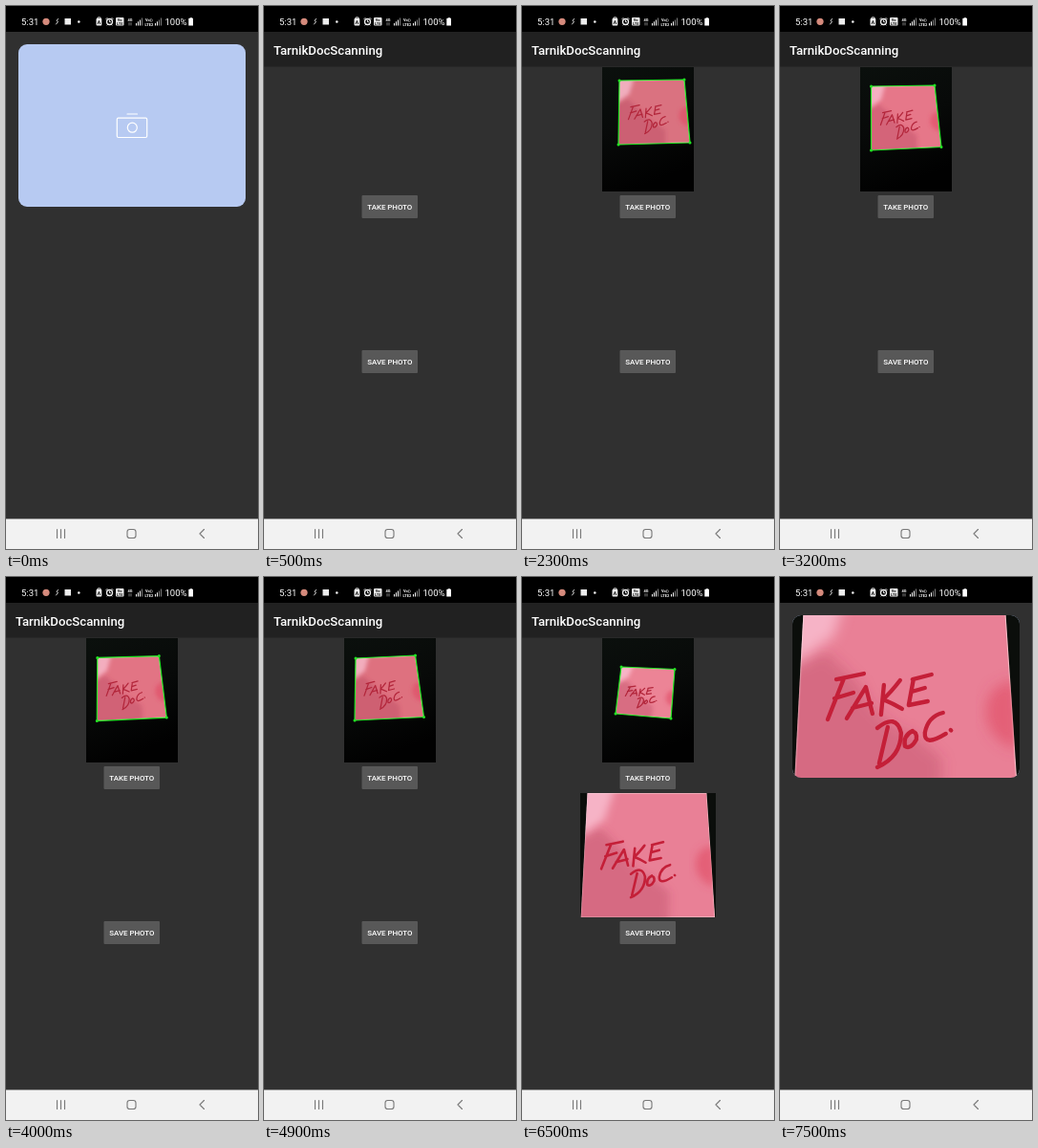
Write an HTML page that moves like this. It is 264 by 568 pixels and loops after 7.6 s.

```html
<!DOCTYPE html>
<html lang="en">
<head>
<meta charset="utf-8">
<title>Document scanner</title>
<style>
  html, body { margin: 0; width: 100%; height: 100%; overflow: hidden; background: #303030; }
  svg { display: block; }
  #stage { width: 264px; height: 568px; }
  text { font-family: Roboto, "Open Sans", sans-serif; fill: #fff; }
  .title { font-size: 13.2px; font-weight: 500; }
  .label { font-size: 7.9px; font-weight: 500; text-anchor: middle; }
  .status { font-size: 9.5px; }
  .tiny { font-size: 4px; font-weight: 700; text-anchor: middle; }
  .line { fill: none; stroke-linecap: round; stroke-linejoin: round; }
</style>
</head>
<body>
<svg id="stage" viewBox="0 0 264 568">
  <defs>
    <linearGradient id="desk" x1="0" y1="0" x2=".3" y2="1">
      <stop offset="0" stop-color="#0b100d"/>
      <stop offset=".5" stop-color="#080a09"/>
      <stop offset="1" stop-color="#010101"/>
    </linearGradient>
    <filter id="softLive" x="-30%" y="-30%" width="160%" height="160%"><feGaussianBlur stdDeviation="2"/></filter>
    <filter id="softShot" x="-30%" y="-30%" width="160%" height="160%"><feGaussianBlur stdDeviation="4"/></filter>
    <clipPath id="view"><rect x="84" y="64" width="96" height="130"/></clipPath>
    <clipPath id="round"><rect x="13" y="40" width="238" height="170" rx="9"/></clipPath>
    <symbol id="shot" viewBox="0 0 142 130" preserveAspectRatio="xMidYMid slice">
      <rect width="142" height="130" fill="#0b0e0b"/>
      <g id="shotPaper"></g>
    </symbol>
  </defs>

  <rect width="264" height="568" fill="#303030"/>
  <g id="home">
    <rect x="13" y="40" width="238" height="170" rx="9" fill="#b7caf2"/>
    <g class="line" stroke="#fff" stroke-width="1.2">
      <rect x="116.3" y="117.2" width="31.4" height="20.3" rx="1.5"/>
      <path d="M127 113H137.500"/>
      <circle cx="132.300" cy="127.200" r="5"/>
    </g>
    <g id="saved" clip-path="url(#round)"><use href="#shot" x="13" y="40" width="238" height="170"/></g>
  </g>

  <g id="app">
    <rect y="27" width="264" height="510" fill="#303030"/>
    <rect y="27" width="264" height="36.500" fill="#212121"/>
    <text class="title" x="10" y="50.500">TarnikDocScanning</text>
    <g id="camera" clip-path="url(#view)">
      <rect x="84" y="64" width="96" height="130" fill="url(#desk)"/>
      <g id="live">
        <g id="livePaper"></g>
        <polygon id="outline" class="line" stroke="#22e522" stroke-width="1.200"/>
        <path id="corners" class="line" stroke="#22e522" stroke-width="3"/>
      </g>
    </g>
    <use id="capture" href="#shot" x="61" y="226" width="142" height="130"/>
    <g fill="#585858">
      <rect x="102.500" y="198" width="58.500" height="24" rx="1"/>
      <rect x="102.500" y="360" width="58.500" height="24" rx="1"/>
    </g>
    <text class="label" x="131.800" y="213">TAKE PHOTO</text>
    <text class="label" x="131.800" y="375">SAVE PHOTO</text>
  </g>

  <rect width="264" height="27" fill="#000"/>
  <text class="status" x="16" y="20">5:31</text>
  <circle cx="42" cy="16.300" r="3.600" fill="#d58a7c"/>
  <path class="line" stroke="#ddd" d="M54.500 13.500L53 15.500L54.500 16.500L52.500 19"/>
  <rect x="61.500" y="13" width="6.500" height="6.500" fill="#eee"/>
  <circle cx="76.300" cy="16.500" r="1.300" fill="#eee"/>
  <rect x="94.500" y="13" width="5.800" height="7.500" rx="1" fill="#eee"/>
  <path class="line" stroke="#eee" d="M96 13V12H99V13"/>
  <path class="line" stroke="#111" d="M96.300 18.500L97.400 15.500L98.500 18.500"/>
  <g class="line" stroke="#eee">
    <circle cx="108.500" cy="16.500" r="3" stroke-width="1.300"/>
    <path d="M108.500 15V16.700H109.500M105 13.500L106 12.500M112 13.500L111 12.500M106 20L106.500 19.500M111 20L110.500 19.500"/>
  </g>
  <rect x="115" y="12" width="8.500" height="8.500" rx="1" fill="#eee"/>
  <text class="tiny" x="119.200" y="16" style="fill:#111">Vo</text>
  <text class="tiny" x="119.200" y="19.800" style="fill:#111">LTE</text>
  <text class="tiny" x="130" y="15.800">4G</text>
  <path class="line" stroke="#999" stroke-width=".8" d="M129 17.500V20M131 17.500V20"/>
  <path id="barsA" stroke="#eee" stroke-width="1.100" d="M136.500 18V20.500M138.500 16.300V20.500M140.500 14.500V20.500"/>
  <path stroke="#777" stroke-width="1.100" d="M142.500 12.500V20.500M162.500 12.500V20.500M160.500 14.500V20.500"/>
  <text class="tiny" x="149.800" y="16">Vo))</text>
  <text class="tiny" x="149.800" y="20.500">LTE2</text>
  <path stroke="#eee" stroke-width="1.100" d="M156.500 18V20.500M158.500 16.300V20.500"/>
  <text class="status" x="166.500" y="20">100%</text>
  <path fill="#fff" d="M192.500 12.200H195.300V13H196V20.500H191.300V13H192.500Z"/>

  <rect y="536.500" width="264" height="31.500" fill="#f2f2f2"/>
  <g class="line" stroke="#777" stroke-width="1.100">
    <path d="M53.500 547.500V556.500M57.500 547.500V556.500M61.500 547.500V556.500M207.500 547.500L203 552L207.500 556.500"/>
    <rect x="127" y="547.500" width="9" height="9" rx="2.600"/>
  </g>
</svg>

<script>
const LOOP = 7600, STEP = 100;
const $ = id => document.getElementById(id);

// Shapes on the note, in the space of the large card.
const INK =
  "M59 107 L88 101 M67 106 L50 149 M57 127 L77 121 " +
  "M70 148 L90 115 L97 143 M76 137 L96 132 " +
  "M109 113 L106 144 M126 108 Q116 121 108 128 Q118 132 128 138 " +
  "M140 107 L135 134 M139 107 L159 102 M138 120 L152 116 M135 134 L155 130 " +
  "M113 157 L104 195 M102 158 Q122 142 127 163 Q127 188 102 199 " +
  "M139 161 Q129 166 131 177 Q137 181 143 170 Q144 161 138 162 " +
  "M171 142 Q155 146 152 163 Q151 178 174 164 M179 160 L179.5 160.5";
const SHADE = "M0 100 L48 78 L84 112 Q100 150 140 165 L170 190 L168 250 L0 250 Z";
const LIGHT = "M10 5 L74 5 L56 62 L14 92 Z";
const SPOT = "M248 108 Q214 112 216 146 Q222 174 250 180 Z";

// time, corners clockwise from top left, paper colour
const POSES = [
  [700, 90, 56, 158, 56, 160, 119, 87, 117, 248, 130, 165],
  [1300, 86, 59, 159, 60, 159, 125.5, 84, 124, 248, 130, 165],
  [2300, 102, 78, 170, 77, 176, 143, 101, 145, 218, 114, 128],
  [3200, 95.5, 84, 162, 83, 169, 147.5, 95.5, 151, 230, 119, 137],
  [4900, 96, 85, 158.5, 82, 167.5, 146.5, 95, 150, 222, 113, 127],
  [6500, 104, 94, 160, 96.5, 156, 148, 98, 143, 236, 132, 150]
];

const mix = (a, b, k) => a + (b - a) * k;
const ramp = (t, a, b) => Math.min(1, Math.max(0, (t - a) / (b - a)));

function place(x, y, q) {
  const v = (y - 16) / 218;
  const left = mix(25.5, 14, v), right = mix(235.5, 250, v);
  const u = (x - left) / (right - left);
  const at = i => mix(mix(q[i], q[i + 2], u), mix(q[i + 6], q[i + 4], u), v);
  return at(0).toFixed(2) + " " + at(1).toFixed(2);
}

const warp = (path, q) =>
  path.replace(/([\d.]+) ([\d.]+)/g, (_, x, y) => place(+x, +y, q));

function makePaper(id, blur, inkWidth, inkColour) {
  const g = $(id);
  g.innerHTML = `<clipPath id="${id}Clip"><polygon/></clipPath>
    <g clip-path="url(#${id}Clip)">
      <polygon stroke="#ffe3e6" stroke-opacity=".55" stroke-width="1.4"/>
      <path fill="#a83a55" fill-opacity=".3" filter="url(#${blur})"/>
      <path fill="#ffd5e6" fill-opacity=".6" filter="url(#${blur})"/>
      <path fill="#e0435e" fill-opacity=".55" filter="url(#${blur})"/>
    </g>
    <path class="line" stroke="${inkColour}" stroke-width="${inkWidth}"/>`;
  const [clip, sheet] = g.querySelectorAll("polygon");
  const paths = g.querySelectorAll("path");
  return (q, colour) => {
    clip.setAttribute("points", q.join(" "));
    sheet.setAttribute("points", q.join(" "));
    sheet.setAttribute("fill", colour);
    [SHADE, LIGHT, SPOT, INK].forEach((s, i) => paths[i].setAttribute("d", warp(s, q)));
  };
}

const drawLive = makePaper("livePaper", "softLive", 1.25, "#b3263b");
const drawShot = makePaper("shotPaper", "softShot", 2.6, "#c41f38");
drawShot([7.5, 0, 132.5, 0, 141.2, 130, 0.6, 130], "#e98096");

function poseAt(t) {
  const last = POSES.length - 1;
  let i = 0;
  while (i < last - 1 && t >= POSES[i + 1][0]) i++;
  const a = POSES[i], b = POSES[i + 1], k = ramp(t, a[0], b[0]);
  return a.slice(1).map((n, j) => mix(n, b[j + 1], k));
}

const show = (id, on) => $(id).setAttribute("visibility", on ? "visible" : "hidden");

function render(t) {
  const opacity = ramp(t, 200, 500) * (1 - ramp(t, 6700, 7000));
  $("app").setAttribute("opacity", opacity);
  show("app", opacity > 0);
  show("saved", t >= 7300);
  if (!opacity) return;
  $("camera").setAttribute("opacity", t >= 600 ? 1 : 0);
  $("live").setAttribute("opacity", t >= 700 ? 1 : 0);
  $("capture").setAttribute("opacity", t >= 5400 ? 1 : 0);
  const pose = poseAt(t), quad = pose.slice(0, 8);
  drawLive(quad, `rgb(${pose.slice(8).map(Math.round)})`);
  const edge = quad.map((n, i) => i % 2 ? Math.max(n, 64.6) : n);
  $("outline").setAttribute("points", edge.join(" "));
  $("corners").setAttribute("d", [0, 2, 4, 6].map(i => `M${edge[i]} ${edge[i + 1]}h.01`).join(""));
}

const start = performance.now();
function tick() {
  const t = (performance.now() - start) % LOOP;
  render(Math.floor(t / STEP) * STEP);
  requestAnimationFrame(tick);
}
tick();
</script>
</body>
</html>
```
